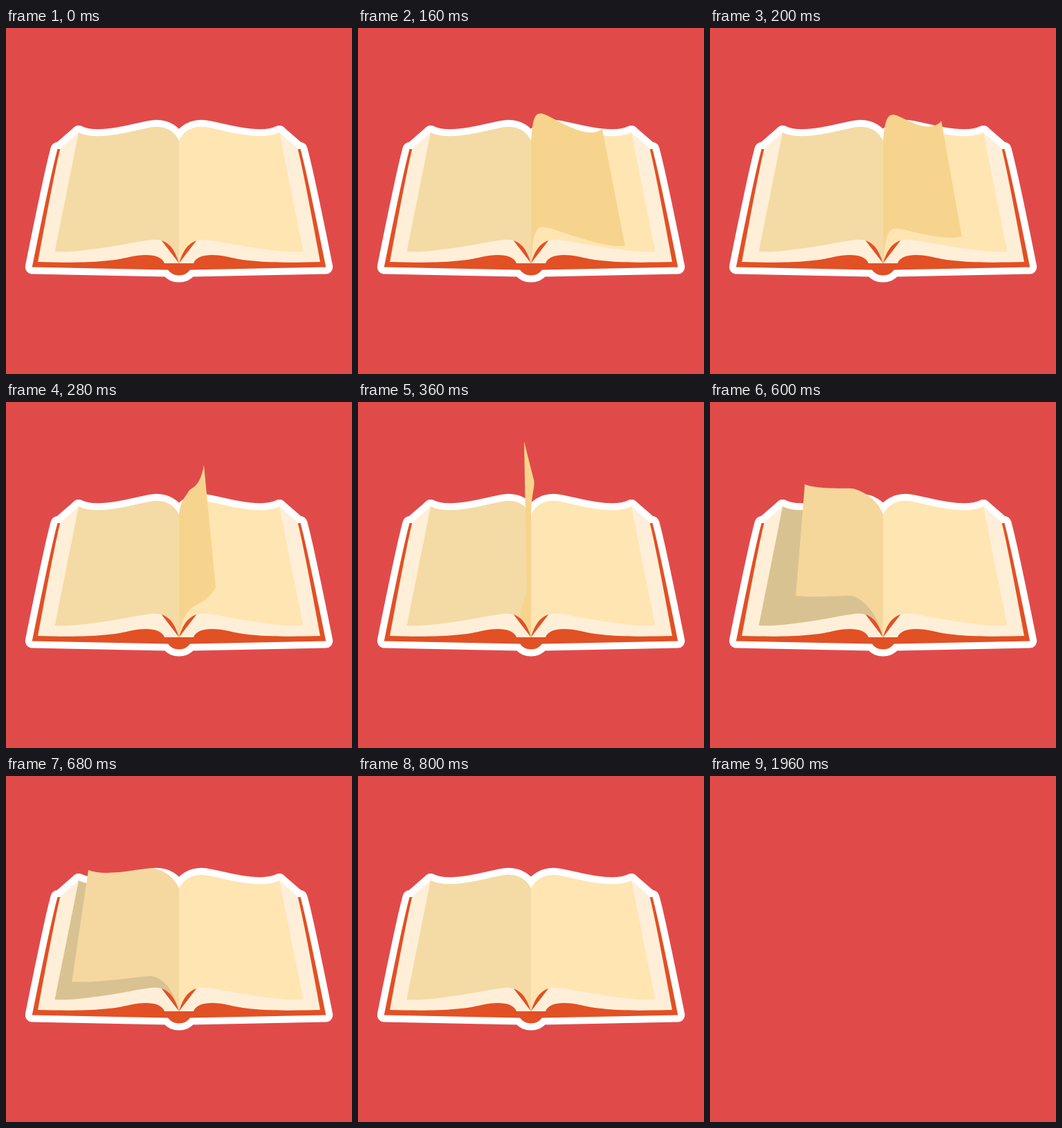
Animation, 500 px wide and 500 px high, one loop 2000 ms. Source, as an HTML page:

```html
<!DOCTYPE html>
<html lang="en">
<head>
<meta charset="utf-8">
<title>Turning page</title>
<style>
  html, body { margin: 0; height: 100%; overflow: hidden; background: #e04b4a; }
  svg { display: block; width: 100%; height: 100%; }
</style>
</head>
<body>
<svg viewBox="0 0 500 500">
  <defs>
    <path id="cover" d="M74.5 175Q66 205 37.7 345.5L234 349.5Q240 357.5 250 357.5T266 349.5L462.3 345.5Q434 205 425.5 175Z"/>
    <path id="block" d="M395 151L421.5 174Q429.5 205 454 338C390 340 350 338 322 331C300 326 276 326 271 340H250Z"/>
    <path id="leaf"/>
    <g id="half"><use href="#block"/><use href="#leaf"/></g>
    <g id="shape">
      <use href="#cover"/>
      <use href="#half"/>
      <use href="#half" transform="matrix(-1 0 0 1 500 0)"/>
    </g>
  </defs>
  <g id="book">
    <use href="#shape" fill="#fff" stroke="#fff" stroke-width="20" stroke-linejoin="round"/>
    <use href="#cover" fill="#e25025"/>
    <g fill="#ffefd8">
      <use href="#block"/>
      <use href="#block" transform="matrix(-1 0 0 1 500 0)"/>
    </g>
    <use href="#leaf" fill="#ffe5b2"/>
    <use id="left" href="#leaf" transform="matrix(-1 0 0 1 500 0)"/>
    <path id="page"/>
  </g>
</svg>
<script>
const LOOP = 2000, STEP = 40, UPRIGHT = 360, TURN_END = 800, HIDE = 1960;
const SPINE_TOP = [250, 163], SPINE_BOTTOM = [250, 340];
const PAPER = [255, 229, 178], RAISED = [247, 212, 142], TURNED = [244, 218, 165];
const SHADED = [217, 194, 146];
const $ = id => document.getElementById(id);

// sag, then points: top hump, top corner, bottom corner, bottom hump
const rest = [17, 286,143, 395,151, 429.5,323, 290,306];
const poses = [
  rest,
  [24, 267,124, 353,146, 386,315, 272,288],
  [24, 264,129, 286,91, 303,268, 268,298],
  [0, 254,112, 240,57, 244,270, 235,305],
  [6, 205,125, 137,119, 124,280, 203,280],
  rest.map((v, i) => i % 2 ? 500 - v : v)
];
const times = [0, 160, 280, UPRIGHT, 600, TURN_END];

const clamp = v => Math.max(0, Math.min(1, v));
const mix = (a, b, u) => a.map((v, i) => v + (b[i] - v) * u);
const rgb = c => `rgb(${c.map(Math.round)})`;

// Smooth interpolation without overshoot, at rest at both ends.
function blend(values, t) {
  const slope = i => (values[i + 1] - values[i]) / (times[i + 1] - times[i]);
  const tangent = i => {
    if (i === 0 || i === times.length - 1) return 0;
    const a = slope(i - 1), b = slope(i);
    return a * b > 0 ? 2 * a * b / (a + b) : 0;
  };
  let i = 0;
  while (i < times.length - 2 && t >= times[i + 1]) i++;
  const span = times[i + 1] - times[i];
  const u = clamp((t - times[i]) / span), w = 1 - u;
  return w * w * (1 + 2 * u) * values[i] + u * u * (3 - 2 * u) * values[i + 1]
    + span * u * w * (w * tangent(i) - u * tangent(i + 1));
}

// Curve from the spine over the hump to the corner, as a list of points.
function bend(spine, hump, corner, sag) {
  const [x, y] = mix(corner, hump, 0.28);
  return [
    spine,
    [mix(spine, hump, 0.15)[0], mix(spine, hump, 0.6)[1]],
    mix(hump, corner, -0.17), hump, mix(hump, corner, 0.17),
    [x, y + sag], corner
  ];
}

function sheet([sag, ...p]) {
  const at = i => [p[2 * i], p[2 * i + 1]];
  const top = bend(SPINE_TOP, at(0), at(1), sag);
  const bottom = bend(SPINE_BOTTOM, at(3), at(2), sag * 0.45).reverse();
  const path = ([first, ...others]) => `${first}C${others.join(' ')}`;
  return `M${path(top)}L${path(bottom)}Z`;
}

function draw(now) {
  const t = Math.floor(now % LOOP / STEP) * STEP;
  const shade = t < TURN_END ? clamp((t - UPRIGHT) / 240) : 0;
  const colour = mix(mix(PAPER, RAISED, clamp(t / 160)), TURNED,
    clamp((t - UPRIGHT) / (TURN_END - UPRIGHT)));
  $('book').style.display = t < HIDE ? '' : 'none';
  $('page').setAttribute('d', sheet(rest.map((_, i) => blend(poses.map(p => p[i]), t))));
  $('page').setAttribute('fill', rgb(colour));
  $('left').setAttribute('fill', rgb(mix(TURNED, SHADED, shade)));
}

$('leaf').setAttribute('d', sheet(rest));
let start;
function tick(now) {
  start ??= now;
  draw(now - start);
  requestAnimationFrame(tick);
}
draw(0);
requestAnimationFrame(tick);
</script>
</body>
</html>
```
